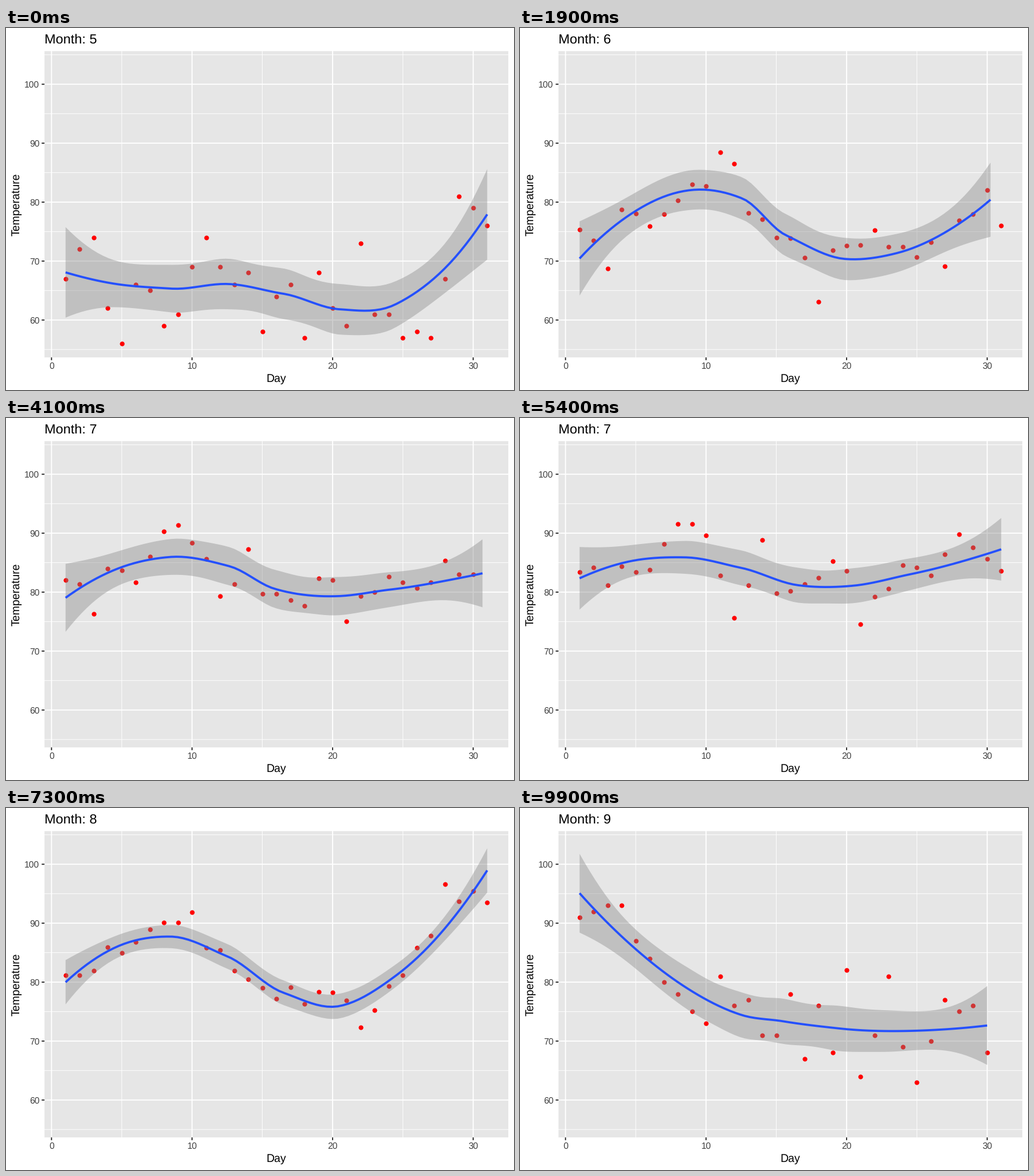
These frames come from a looping animation (885x632 px, 10 s). A matplotlib script:

```python
import numpy as np
import matplotlib.pyplot as plt
from matplotlib.animation import FuncAnimation

W, H, DPI = 885, 632, 100
FRAMES, STEP = 100, 100
FONT = "Liberation Sans"
plt.rcParams["text.hinting"] = "none"

# Daily temperatures, one list per month
MAY = [67, 72, 74, 62, 56, 66, 65, 59, 61, 69, 74, 69, 66, 68, 58, 64,
       66, 57, 68, 62, 59, 73, 61, 61, 57, 58, 57, 67, 81, 79, 76]
JUN = [78, 74, 67, 84, 85, 79, 82, 87, 90, 87, 93, 92, 82, 80, 79, 77,
       72, 65, 73, 76, 77, 76, 76, 76, 75, 78, 73, 80, 77, 83]
JUL = [84, 85, 81, 84, 83, 83, 88, 92, 92, 89, 82, 73, 81, 91, 80, 81,
       82, 84, 87, 85, 74, 81, 82, 86, 85, 82, 86, 88, 86, 83, 81]
AUG = [81, 81, 82, 86, 85, 87, 89, 90, 90, 92, 86, 86, 82, 80, 79, 77,
       79, 76, 78, 78, 77, 72, 75, 79, 81, 86, 88, 97, 94, 96, 94]
SEP = [91, 92, 93, 93, 87, 84, 80, 78, 75, 73, 81, 76, 77, 71, 71, 78,
       67, 76, 68, 82, 64, 71, 81, 69, 63, 70, 77, 75, 76, 68]
TEMPS = [np.array(m, float) for m in (MAY, JUN, JUL, AUG, SEP)]
KEYS = [0, 25, 49, 74, 99]

# Panel in pixels from the top left, and its data limits
LEFT, RIGHT, TOP, BOTTOM = 67.05, 875.05, 40.4, 575.1
XLIM = (-0.5, 32.5)
Y100, PER_DEG = 98.2, 10.29
YLIM = (100 - (BOTTOM - Y100) / PER_DEG, 100 + (Y100 - TOP) / PER_DEG)


def cuts(lo, hi):
    """Median splits of the days lo..hi down to cells of four."""
    if hi - lo < 4:
        return []
    mid = (lo + hi) // 2
    return cuts(lo, mid) + [mid + 0.5] + cuts(mid + 1, hi)


def smoother(n, at):
    """Matrix taking n daily values to the loess curve at the given days."""
    days = np.arange(1, n + 1)
    edge = 0.005 * (n - 1)
    knots = np.array([1 - edge, *cuts(1, n), n + edge])
    near = int(0.75 * n)
    value, slope = [], []
    for knot in knots:
        d = days - knot
        reach = np.sort(abs(d))[near - 1]
        w = np.clip(1 - (abs(d) / reach) ** 3, 0, None) ** 1.5
        fit = np.linalg.pinv(np.vander(d, 3, increasing=True) * w[:, None]) * w
        value.append(fit[0])
        slope.append(fit[1])
    value, slope = np.array(value), np.array(slope)

    # Cubic Hermite blending between knots
    k = np.searchsorted(knots, at) - 1
    size = (knots[k + 1] - knots[k])[:, None]
    u = (at - knots[k])[:, None] / size
    return (value[k] * (1 + 2 * u) * (1 - u) ** 2
            + value[k + 1] * u ** 2 * (3 - 2 * u)
            + size * slope[k] * u * (1 - u) ** 2
            - size * slope[k + 1] * u ** 2 * (1 - u))


def t_quantile(df, z=1.959964):
    return (z + (z ** 3 + z) / (4 * df)
            + (5 * z ** 5 + 16 * z ** 3 + 3 * z) / (96 * df ** 2))


def trend(temps):
    """Rows of x, mean, lower and upper bound of the 95 % band."""
    n = len(temps)
    days = np.arange(1, n + 1)
    x = np.linspace(1, n, 80)
    hat, op = smoother(n, days), smoother(n, x)
    rest = np.eye(n) - hat
    m = rest @ rest.T
    d1, d2 = np.trace(m), (m * m).sum()
    scale = np.sqrt(((rest @ temps) ** 2).sum() / d1)
    half = t_quantile(d1 ** 2 / d2) * scale * np.sqrt((op ** 2).sum(axis=1))
    y = op @ temps
    return np.array([x, y, y - half, y + half])


TRENDS = [trend(t) for t in TEMPS]


def px(v):
    return v * 72 / DPI


fig = plt.figure(figsize=(W / DPI, H / DPI), dpi=DPI, facecolor="white")
ax = fig.add_axes([LEFT / W, 1 - BOTTOM / H, (RIGHT - LEFT) / W, (BOTTOM - TOP) / H],
                  xlim=XLIM, ylim=YLIM, facecolor="#e6e6e6")
ax.patch.set_snap(False)
ax.set(xticks=[], yticks=[])
ax.spines[:].set_visible(False)


def put(x, y, text, size, color="black", **kw):
    return fig.text(x / W, 1 - y / H, text, fontname=FONT, fontsize=px(size),
                    color=color, **kw)


def rule(xs, ys, width, color):
    line = plt.Line2D([x / W for x in xs], [1 - y / H for y in ys], lw=px(width),
                      color=color, solid_capstyle="butt", snap=False,
                      transform=fig.transFigure)
    fig.add_artist(line)


def to_x(day):
    return LEFT + (day - XLIM[0]) * (RIGHT - LEFT) / (XLIM[1] - XLIM[0])


def to_y(temp):
    return Y100 + (100 - temp) * PER_DEG


grid = dict(color="white", snap=False, zorder=1)
for day in range(0, 31, 5):
    ax.axvline(day, lw=px(0.95 if day % 10 else 1.9), **grid)
for temp in range(55, 106, 5):
    ax.axhline(temp, lw=px(0.95 if temp % 10 else 1.9), **grid)

TICK, LABEL = "#2b2b2b", "#404040"
for day in range(0, 31, 10):
    x = to_x(day)
    rule((x, x), (BOTTOM, BOTTOM + 4.9), 1.9, TICK)
    put(x, 595.3, str(day), 15.6, LABEL, ha="center")
for temp in range(60, 101, 10):
    y = to_y(temp)
    rule((LEFT - 4.9, LEFT), (y, y), 1.9, TICK)
    put(58.3, y + 5.6, str(temp), 15.6, LABEL, ha="right")

put((LEFT + RIGHT) / 2, 618.2, "Day", 19.55, ha="center")
put(23.7, (TOP + BOTTOM) / 2, "Temperature", 19.55, rotation=90,
    ha="right", va="center", rotation_mode="default").set(
        rotation_mode="anchor", ha="center", va="baseline")
title = put(LEFT, 26.5, "", 23.46)

dots = ax.scatter([], [], s=px(8.2) ** 2, c="#ff0000", linewidths=0, zorder=2)
dots.set_snap(False)
band, = ax.fill([0, 0, 0], [60, 60, 60], color="#878787", alpha=0.4, lw=0, zorder=3)
curve, = ax.plot([], [], color="#2450ff", lw=px(3.79), solid_capstyle="butt",
                 solid_joinstyle="round", zorder=4)


def draw(i):
    seg = max(k for k in range(len(KEYS)) if KEYS[k] <= i)
    now, shape = TEMPS[seg].copy(), TRENDS[seg]
    if KEYS[seg] < i:
        f = (i - KEYS[seg]) / (KEYS[seg + 1] - KEYS[seg])
        # A day missing from the next month holds still until the month ends
        n = min(len(now), len(TEMPS[seg + 1]))
        now[:n] += f * (TEMPS[seg + 1][:n] - now[:n])
        shape = (1 - f) * shape + f * TRENDS[seg + 1]
    x, y, low, high = shape
    dots.set_offsets(np.column_stack([np.arange(1, len(now) + 1), now]))
    band.set_xy(np.column_stack([np.r_[x, x[::-1]], np.r_[high, low[::-1]]]))
    curve.set_data(x, y)
    title.set_text(f"Month: {round(5 + 4 * i / (FRAMES - 1))}")
    return dots, band, curve, title


anim = FuncAnimation(fig, draw, frames=FRAMES, interval=STEP, repeat=True,
                     repeat_delay=0, blit=False)
plt.show()
```
